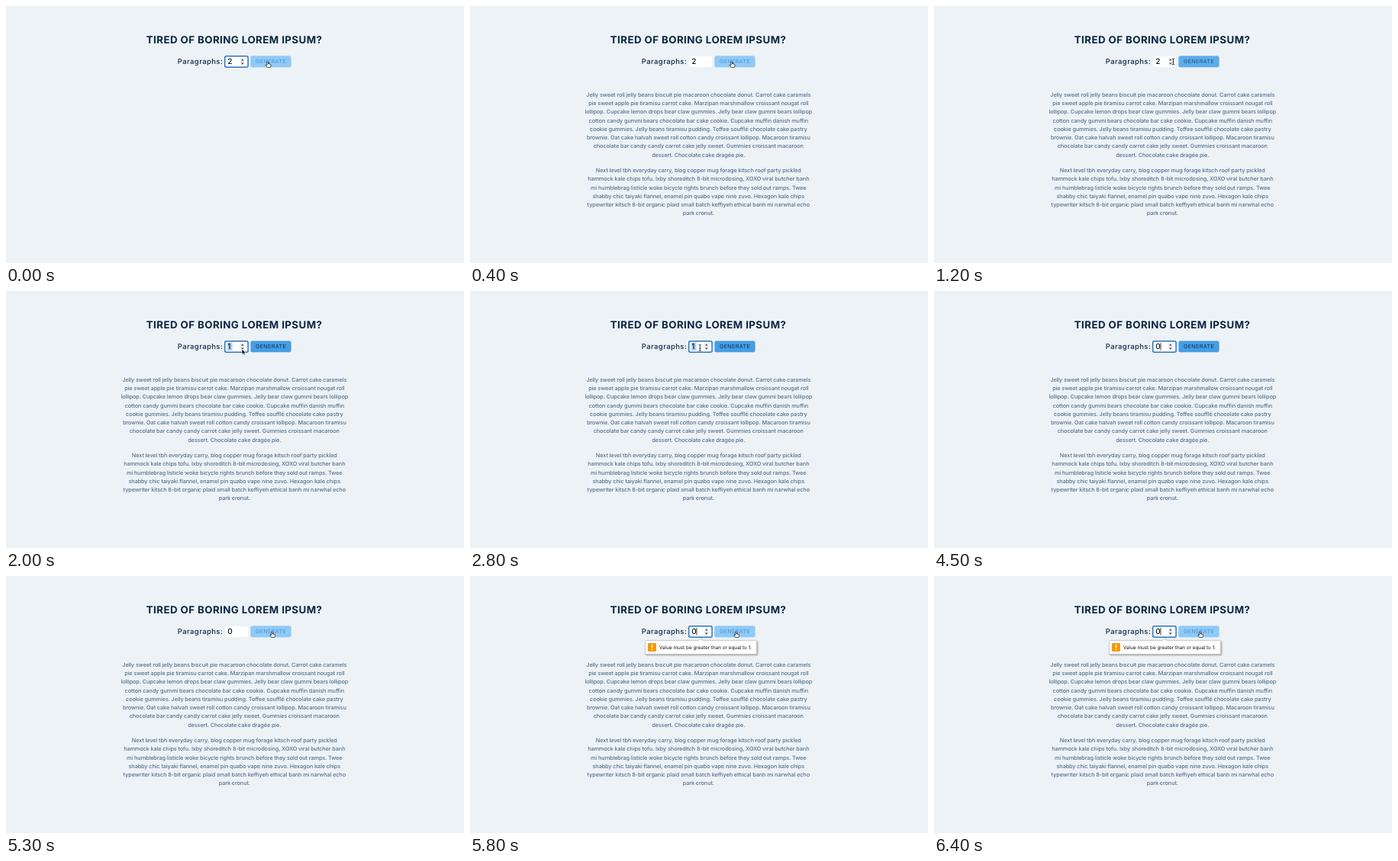
Write an HTML page that moves like this. It is 600 px wide and 337 px high and loops after 6500 ms.

```html
<!DOCTYPE html>
<html lang="en">
<head>
<meta charset="utf-8">
<title>Paragraph generator</title>
<style>
  html, body { margin: 0; width: 100%; height: 100%; overflow: hidden; background: #edf2f6; }
  svg { display: block; width: 600px; height: 337px; font-family: Inter, "Open Sans", sans-serif; text-rendering: geometricPrecision; }
  .title { font-size: 13.3px; font-weight: 700; letter-spacing: .43px; fill: #0a2543; }
  .label { font-size: 9.5px; font-weight: 500; letter-spacing: .4px; fill: #0f2a47; }
  .value { font-size: 10px; font-weight: 500; fill: #081420; }
  .action { font-size: 7px; letter-spacing: .46px; }
  .copy { font-size: 7.3px; font-weight: 500; letter-spacing: -.1px; fill: #54708f; text-anchor: middle; }
  .tip { font-size: 6.37px; fill: #111; }
  .soft { filter: drop-shadow(0 .5px .6px rgba(30, 60, 90, .22)); }
  .lift { filter: drop-shadow(1px 1.5px 1.2px rgba(0, 0, 0, .4)); }
</style>
</head>
<body>
<svg viewBox="0 0 600 337">
  <rect width="600" height="337" fill="#edf2f6"/>
  <text class="title" x="183.8" y="48.6">TIRED OF BORING LOREM IPSUM?</text>
  <text class="label" x="224.8" y="76.1">Paragraphs:</text>

  <rect x="287" y="66" width="30" height="14" rx="2" fill="#fff"/>
  <rect id="ring" x="286.7" y="65.7" width="30.4" height="14.6" rx="2" fill="none" stroke="#2b74c4" stroke-width="1.5"/>
  <rect id="mark" x="290" y="67.5" width="6.5" height="10.5" fill="#a9d0f7"/>
  <text id="value" class="value" x="290.2" y="76.3"></text>
  <rect id="caret" y="68" width=".8" height="9.6" fill="#111"/>
  <g id="spinner">
    <rect x="306.5" y="67.8" width="6.6" height="10.4" rx="1.5" fill="#f1f1f2"/>
    <rect id="press" x="306.5" y="73" width="6.6" height="5.2" rx="1.5" fill="#c9ccd0"/>
    <path d="M308 71.4L309.8 69.2L311.6 71.4ZM308 74.6L309.8 76.8L311.6 74.6Z" fill="#444"/>
  </g>

  <rect id="button" class="soft" x="320.5" y="65.5" width="53" height="14.8" rx="2"/>
  <text id="action" class="action" x="327" y="75.3">GENERATE</text>

  <g id="copy"></g>

  <g id="tip">
    <path class="lift" d="M230.5 84.5H299.5L302 81.8L304.5 84.5H374.5Q375.5 84.5 375.5 85.5V101.5Q375.5 102.5 374.5 102.5H230.5Q229.5 102.5 229.5 101.5V85.5Q229.5 84.5 230.5 84.5Z" fill="#fff" stroke="#b4b8bd" stroke-width=".6"/>
    <rect x="233" y="88" width="11" height="11" rx="1.2" fill="#fb9700"/>
    <path d="M238.5 89.8V94.4M238.5 95.8V97.3" stroke="#fff" stroke-width="1.5"/>
    <text class="tip" x="248" y="95.8">Value must be greater than or equal to 1.</text>
  </g>

  <g id="pointer">
    <path id="hand" transform="scale(.8)" d="M-1 0Q0-1 1 0V3.2Q2-.1 2.4 3.4Q3.5 2.6 3.8 3.8Q5.1 3.1 5.1 4.6V6.5L4.3 9H-.8L-3.3 5.4Q-3.1 3.9-1.8 4.7L-1 5.4Z" fill="#fff" stroke="#222" stroke-width="1" stroke-linejoin="round"/>
    <path id="beam" d="M-1.6-4Q0-4 0-3Q0-4 1.6-4M0-3V3M-1.6 4Q0 4 0 3Q0 4 1.6 4M-.8 .9H.8" fill="none" stroke="#222" stroke-width=".9"/>
    <path id="arrow" d="M0 0V7.2L1.7 5.7L2.9 8.3L4.1 7.7L3 5.2H5.2Z" fill="#111" stroke="#fff" stroke-width=".6"/>
  </g>
</svg>
<script>
const LOOP = 6500, STEP = 100;
const $ = id => document.getElementById(id);

const paragraphs = [
  [118.7, `Jelly sweet roll jelly beans biscuit pie macaroon chocolate donut. Carrot cake caramels
pie sweet apple pie tiramisu carrot cake. Marzipan marshmallow croissant nougat roll
lollipop. Cupcake lemon drops bear claw gummies. Jelly bear claw gummi bears lollipop
cotton candy gummi bears chocolate bar cake cookie. Cupcake muffin danish muffin
cookie gummies. Jelly beans tiramisu pudding. Toffee soufflé chocolate cake pastry
brownie. Oat cake halvah sweet roll cotton candy croissant lollipop. Macaroon tiramisu
chocolate bar candy candy carrot cake jelly sweet. Gummies croissant macaroon
dessert. Chocolate cake dragée pie.`],
  [218, `Next level tbh everyday carry, blog copper mug forage kitsch roof party pickled
hammock kale chips tofu. Ixby shoreditch 8-bit microdosing, XOXO viral butcher banh
mi humblebrag listicle woke bicycle rights brunch before they sold out ramps. Twee
shabby chic taiyaki flannel, enamel pin quabo vape nine zuvo. Hexagon kale chips
typewriter kitsch 8-bit organic plaid small batch keffiyeh ethical banh mi narwhal echo
park cronut.`]
];

for (const [top, body] of paragraphs) {
  body.split("\n").forEach((line, i) => {
    const text = document.createElementNS("http://www.w3.org/2000/svg", "text");
    text.setAttribute("class", "copy");
    text.setAttribute("x", 299.3);
    text.setAttribute("y", top + i * 11.28);
    text.textContent = line;
    $("copy").append(text);
  });
}

// Each row: start time, value held until the next row
const steps = {
  value: [[0, "2"], [1600, "1"], [4100, ""], [4400, "0"]],
  focus: [[0, 1], [100, 0], [1600, 1], [5200, 0], [5500, 1]],
  copy: [[0, 0], [200, 1]],
  mark: [[0, 0], [1600, 1], [2900, 0]],
  press: [[0, 0], [1600, 1], [1800, 0]],
  caret: [[0, 0], [3300, 1], [3800, 0], [4000, 1], [5200, 0], [5500, 1], [5900, 0], [6300, 1]],
  spinner: [[0, 1], [100, 0], [1200, 1], [5200, 0], [5500, 1]],
  tip: [[0, 0], [5600, 1]],
  pointer: [[0, "hand"], [1100, "beam"], [1300, "arrow"], [2500, "beam"], [4000, ""], [4900, "beam"], [5000, "arrow"], [5100, "hand"]]
};

// Each row: time, x, y
const path = [
  [0, 342.8, 73.4], [800, 342.8, 73.4], [1200, 313.5, 73], [1400, 309, 76],
  [2300, 309, 76], [2700, 301.3, 74.5], [4900, 301.3, 74.5], [5200, 348.4, 73.4]
];
const hover = [[0, 1], [1000, 1], [1300, 0], [5000, 0], [5300, 1]];

const held = (rows, t) => rows.filter(row => row[0] <= t).pop()[1];

function between(rows, t) {
  const i = rows.findIndex(row => row[0] > t);
  if (i < 0) return rows[rows.length - 1].slice(1);
  const a = rows[i - 1], b = rows[i];
  const k = (t - a[0]) / (b[0] - a[0]);
  return a.slice(1).map((v, n) => v + (b[n + 1] - v) * k);
}

const blend = (a, b, k) => `rgb(${a.map((v, i) => Math.round(v + (b[i] - v) * k))})`;
const show = (id, on) => { $(id).style.visibility = on ? "visible" : "hidden"; };

function draw(t) {
  const now = name => held(steps[name], t);
  const value = now("value");
  $("value").textContent = value;
  $("caret").setAttribute("x", { "": 290.4, "1": 295.2, "0": 296.6 }[value] || 296.6);
  show("ring", now("focus"));
  for (const id of ["copy", "mark", "press", "caret", "spinner", "tip"]) show(id, now(id));

  const [k] = between(hover, t);
  $("button").setAttribute("fill", blend([69, 157, 227], [143, 202, 247], k));
  $("action").setAttribute("fill", blend([10, 50, 84], [68, 152, 220], k));

  const [x, y] = between(path, t);
  $("pointer").setAttribute("transform", `translate(${x} ${y})`);
  for (const id of ["hand", "beam", "arrow"]) show(id, now("pointer") === id);
}

const start = performance.now();
function tick() {
  const t = (performance.now() - start) % LOOP;
  draw(Math.floor(t / STEP) * STEP);
  requestAnimationFrame(tick);
}
tick();
</script>
</body>
</html>
```
